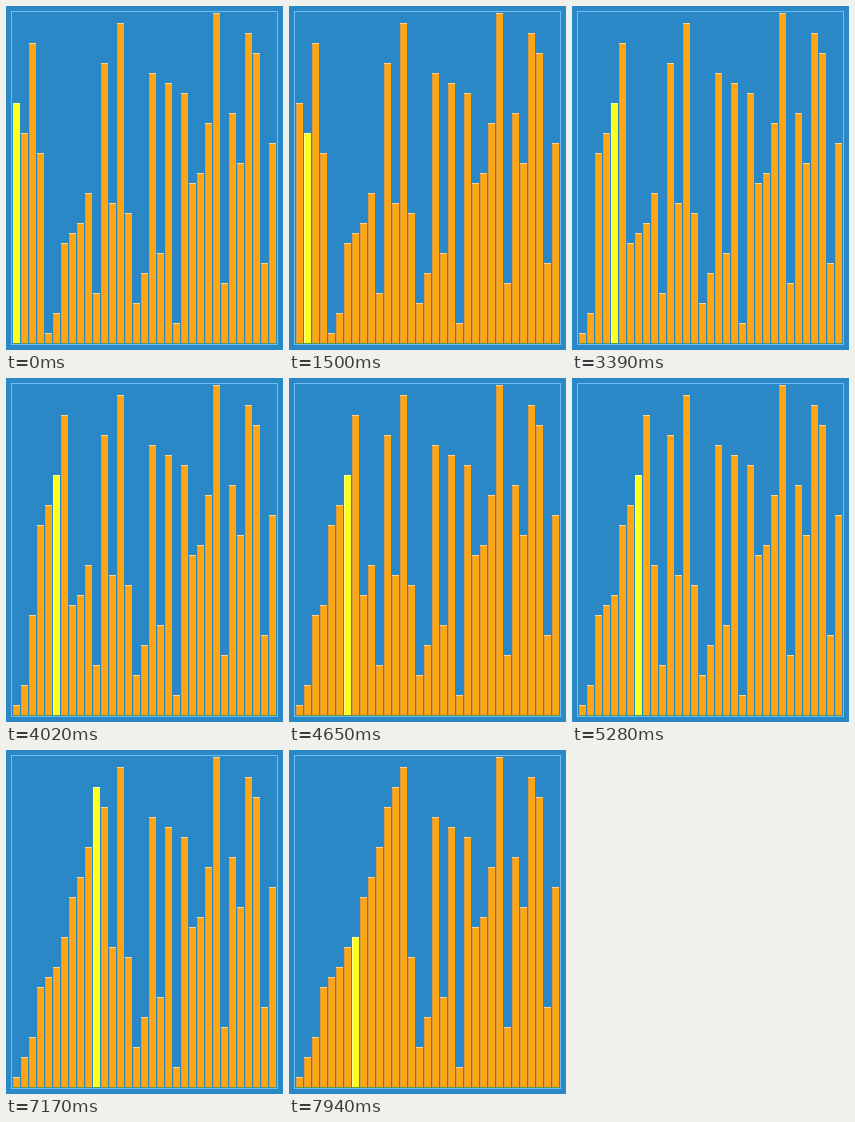
An HTML page that plays this animation: 277x344 px, repeating every 8000 ms.

```html
<!DOCTYPE html>
<html lang="en">
<head>
<meta charset="utf-8">
<title>Gnome sort</title>
<style>
  html, body { margin: 0; width: 100%; height: 100%; overflow: hidden; background: #2b88c6; }
  svg { display: block; }
</style>
</head>
<body>
<svg id="stage" width="277" height="344" viewBox="0 0 277 344" shape-rendering="crispEdges">
  <rect width="277" height="344" fill="#2b88c6"/>
  <rect x="5.5" y="5.5" width="266" height="333" fill="none" stroke="#6fbdf3"/>
</svg>
<script>
const LOOP = 8000, HOLD = 1500, STEP = 70;
const BASE = 337, UNIT = 10, PITCH = 8, LEFT = 7;
const start = [24, 21, 30, 19, 1, 3, 10, 11, 12, 15, 5, 28, 14, 32, 13, 4, 7,
  27, 9, 26, 2, 25, 16, 17, 22, 33, 6, 23, 18, 31, 29, 8, 20];
const stage = document.getElementById('stage');

function addRect(x, width, height, fill) {
  const r = document.createElementNS('http://www.w3.org/2000/svg', 'rect');
  const attrs = { x, y: BASE, width, height, fill };
  for (const k in attrs) r.setAttribute(k, attrs[k]);
  return stage.appendChild(r);
}

const bars = start.map((_, i) => {
  const x = LEFT + i * PITCH;
  const bar = {
    edge: addRect(x, 7, 1, '#96968a'),
    body: addRect(x + 1, 6, 1, '#ffa615'),
    cap: addRect(x, 7, 1, '#ffd08a')
  };
  addRect(x, 7, 1, '#5f9a3c');
  return bar;
});

// Gnome sort: one comparison per step
function sortState(steps) {
  const list = start.slice();
  let pos = 0;
  for (let n = 0; n < steps; n++) {
    if (pos === 0 || list[pos - 1] <= list[pos]) {
      pos++;
    } else {
      [list[pos - 1], list[pos]] = [list[pos], list[pos - 1]];
      pos--;
    }
  }
  return { list, pos };
}

let shown = -1;
function draw(t) {
  const steps = t < HOLD ? 0 : Math.floor((t - HOLD) / STEP) + 1;
  if (steps === shown) return;
  shown = steps;
  const { list, pos } = sortState(steps);
  bars.forEach(({ edge, body, cap }, i) => {
    const h = list[i] * UNIT, active = i === pos;
    for (const part of [edge, body, cap]) part.setAttribute('y', BASE - h);
    edge.setAttribute('height', h);
    body.setAttribute('height', h);
    edge.setAttribute('fill', active ? '#ffff8a' : '#d39a48');
    body.setAttribute('fill', active ? '#ffff1e' : '#ffa615');
    cap.setAttribute('fill', active ? '#ffffa0' : '#ffd08a');
  });
}

const t0 = performance.now();
function tick() {
  draw((performance.now() - t0) % LOOP);
  requestAnimationFrame(tick);
}
draw(0);
requestAnimationFrame(tick);
</script>
</body>
</html>
```
